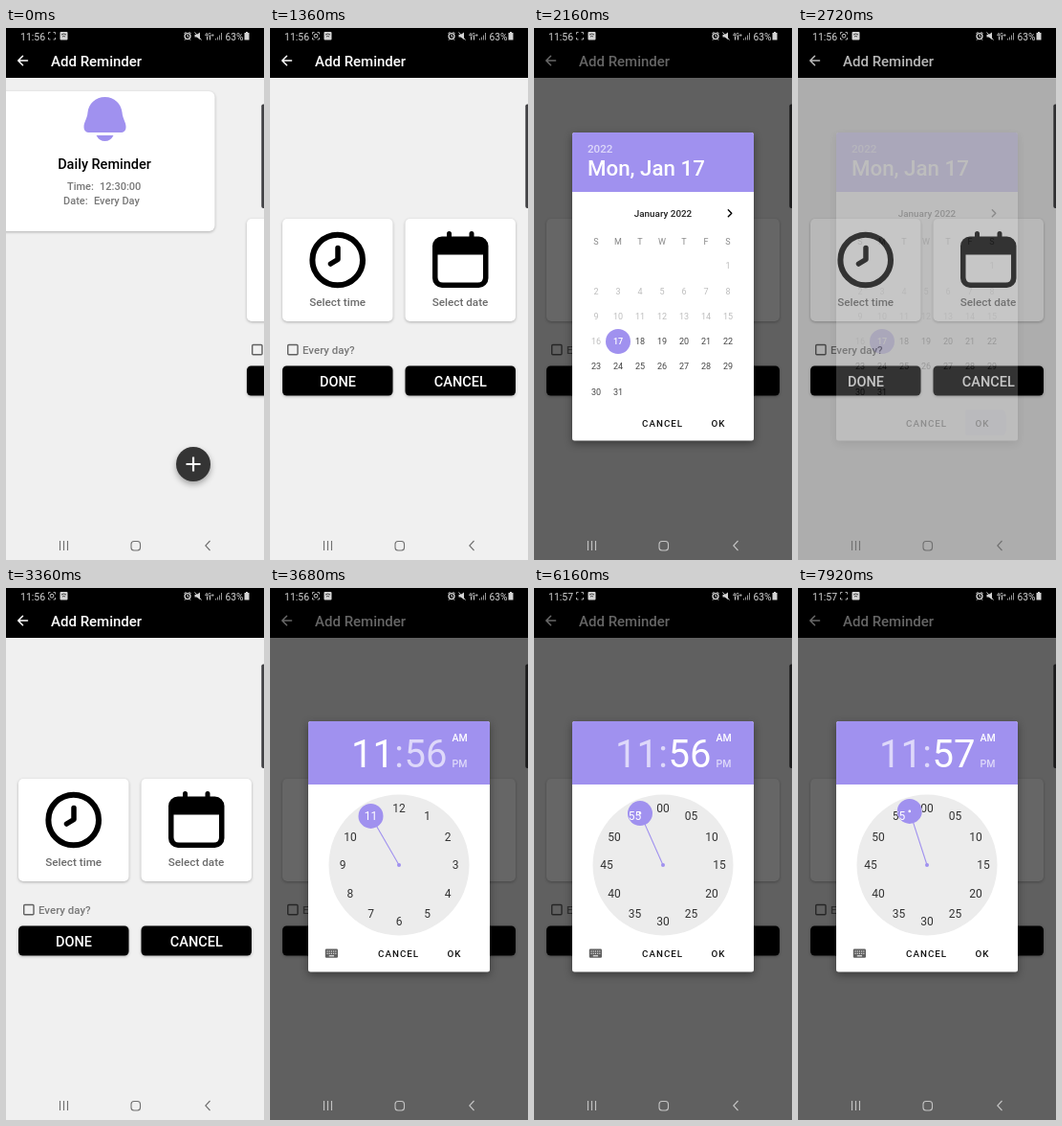
Write an HTML page that moves like this. It is 270x555 px and loops after 8000 ms.

```html
<!DOCTYPE html>
<html lang="en">
<head>
<meta charset="utf-8">
<title>Add reminder</title>
<style>
  html, body { margin: 0; width: 100%; height: 100%; overflow: hidden; background: #f0f0f0; }
  svg { display: block; width: 100vw; height: 100vh; }
  text { font-family: Roboto, "Open Sans", sans-serif; }
  .m { font-weight: 500; }
  .mid { text-anchor: middle; }
  .white { fill: #fff; }
  .soft { fill: #fff; fill-opacity: .65; }
  .grey { fill: #787878; }
  .purple { fill: #a091ef; }
  .card { fill: #fff; filter: drop-shadow(0 1px 1.5px #0004); }
  .dialog { filter: drop-shadow(0 3px 4px #0006); }
  .line { fill: none; stroke: #000; stroke-linecap: round; stroke-linejoin: round; }
  .action { font-size: 9.8px; font-weight: 500; letter-spacing: 1px; fill: #111; }
  .button { font-size: 14.5px; font-weight: 500; fill: #fff; text-anchor: middle; }
  .caption { font-size: 11.7px; font-weight: 500; fill: #6c6c6c; text-anchor: middle; }
  .cell { font-size: 9px; text-anchor: middle; }
  .labels { font-size: 12px; text-anchor: middle; }
  .big { font-size: 40px; }
</style>
</head>
<body>
<svg viewBox="0 0 270 555" preserveAspectRatio="none">
  <defs>
    <clipPath id="knobClip"><circle id="knobHole" r="13"/></clipPath>
    <clipPath id="okClip"><rect x="175" y="398" width="43" height="27" rx="3"/></clipPath>
  </defs>
  <rect width="270" height="555" fill="#f0f0f0"/>

  <g id="listPage">
    <rect class="card" x="20" y="66" width="229.500" height="146" rx="6"/>
    <g class="purple" transform="translate(134.500)">
      <path d="M0 72C10 72 17 79 18 88C18.600 95 22 98 22 103C22 107 20 109 16 109H-16C-20 109-22 107-22 103C-22 98-18.600 95-18 88C-17 79-10 72 0 72Z"/>
      <path d="M-9 112H9Q6 118 0 118T-9 112Z"/>
    </g>
    <text class="m mid" x="134" y="147" font-size="14.500">Daily Reminder</text>
    <g class="m grey" font-size="11">
      <text x="95" y="169">Time:</text><text x="129" y="169">12:30:00</text>
      <text x="91" y="184">Date:</text><text x="123" y="184">Every Day</text>
    </g>
    <circle cx="227" cy="455" r="18" fill="#343434" style="filter:drop-shadow(0 3px 3px #0005)"/>
    <path d="M219.500 455h15M227 447.500v15" stroke="#fff" stroke-width="2.200"/>
  </g>

  <g id="formPage">
    <rect class="card" x="13" y="199" width="115.500" height="107" rx="5"/>
    <rect class="card" x="141.500" y="199" width="115.500" height="107" rx="5"/>
    <circle class="line" cx="70.700" cy="242" r="26.300" stroke-width="6"/>
    <path class="line" d="M71 229.500V241.500L63.500 246" stroke-width="5.500"/>
    <rect x="170" y="217.500" width="58.500" height="53.500" rx="10"/>
    <path class="white" d="M175.500 236.500H223V260Q223 265.500 217.500 265.500H181Q175.500 265.500 175.500 260Z"/>
    <path class="line" d="M187.500 214.500v6M211 214.500v6" stroke-width="5"/>
    <text class="caption" x="70.700" y="290">Select time</text>
    <text class="caption" x="199" y="290">Select date</text>
    <rect x="18.700" y="330.500" width="10.300" height="10.300" rx="1" fill="none" stroke="#606060" stroke-width="1.400"/>
    <text class="m grey" x="34" y="340" font-size="11.500">Every day?</text>
    <rect class="card" style="fill:#000" x="13" y="352.500" width="115.500" height="31" rx="4.500"/>
    <rect class="card" style="fill:#000" x="141.500" y="352.500" width="115.500" height="31" rx="4.500"/>
    <text class="button" x="71" y="374">DONE</text>
    <text class="button" x="199.300" y="374">CANCEL</text>
  </g>

  <rect width="270" height="52"/>
  <path class="line" d="M22.500 34H13M17.500 29.300L12.800 34L17.500 38.700" style="stroke:#fff" stroke-width="1.600"/>
  <text class="m white" x="47" y="40" font-size="15">Add Reminder</text>
  <rect x="267.300" y="79.500" width="6" height="108.500" rx="2" fill="#414144"/>

  <rect id="scrim" width="270" height="555"/>

  <!-- status bar -->
  <g fill="#d4d4d4">
    <text id="clock" x="15" y="12.500" font-size="10.500"></text>
    <path d="M44.500 6.500v-2h2M49.500 4.500h2v2M44.500 10v2h2M49.500 12h2v-2" fill="none" stroke="#aaa"/>
    <circle id="eye" cx="48" cy="8.200" r="1.900" fill="none" stroke="#ccc"/>
    <rect x="56.500" y="4" width="8" height="8.500" rx="1"/>
    <path d="M58 7q2.500-2 5 0M59 9q1.500-1.200 3 0" fill="none" stroke="#333" stroke-width=".9"/>
    <circle cx="190" cy="8.600" r="3" fill="none" stroke="#d4d4d4" stroke-width="1.300"/>
    <path d="M186.500 6l2-2M193.500 6l-2-2M190 7v2h1.500M188 11.500l-1 1.200M192 11.500l1 1.200M197.500 4.500l7 8" stroke="#d4d4d4" fill="none"/>
    <path d="M197.500 7h2l3.500-2.500v7.500l-3.500-2.500h-2Z"/>
    <text class="m" x="208" y="8.500" font-size="5.500">4G+</text>
    <path d="M210.500 9v3.500M213.500 9v3.500" stroke="#d4d4d4"/>
    <path d="M219.500 12.500v-1.500M221.500 12.500v-3M223.500 12.500v-5M225.500 12.500v-7.500" stroke="#999"/>
    <text x="229.500" y="12.500" font-size="10.200">63%</text>
    <path d="M249.500 5h1.500v-1h2v1h1.500v7.500h-5Z"/>
  </g>

  <!-- navigation bar -->
  <g id="nav" fill="none" stroke-width="1.100">
    <path d="M56.500 535v10M60.500 535v10M64.500 535v10M213.500 535l-4.700 5l4.700 5"/>
    <rect x="131" y="535.500" width="9.500" height="9.500" rx="3"/>
  </g>

  <g id="dateDialog" class="dialog">
    <rect class="white" x="40" y="109" width="190" height="321.500" rx="2.500"/>
    <path class="purple" d="M40 171V111.500Q40 109 42.500 109H227.500Q230 109 230 111.500V171Z"/>
    <text class="m soft" x="56" y="130" font-size="11.600">2022</text>
    <text class="m white" x="56" y="154" font-size="22.300">Mon, Jan 17</text>
    <text class="m mid" x="135" y="197" font-size="9.900" fill="#222">January 2022</text>
    <path class="line" d="M203.300 189.800l3.500 3.500l-3.500 3.500" stroke-width="1.400"/>
    <circle class="purple" cx="88" cy="327" r="13"/>
    <g id="days"></g>
    <circle id="ripple" class="purple" cx="193" cy="412" clip-path="url(#okClip)" fill-opacity=".15"/>
    <text class="action" x="113" y="416">CANCEL</text>
    <text class="action" x="185.500" y="416">OK</text>
  </g>

  <g id="timeDialog" class="dialog">
    <rect class="white" x="40" y="139" width="190" height="261.500" rx="2.500"/>
    <path class="purple" d="M40 205V141.500Q40 139 42.500 139H227.500Q230 139 230 141.500V205Z"/>
    <text id="hour" class="big" x="85" y="187">11</text>
    <text class="big soft" x="130.200" y="187">:</text>
    <text id="minute" class="big" x="140.500" y="187"></text>
    <text class="m white" x="190.500" y="160" font-size="10.500">AM</text>
    <text class="m soft" x="190.500" y="186.500" font-size="10.500">PM</text>
    <circle cx="135" cy="289" r="73.500" fill="#ececec"/>
    <g class="labels" fill="#333"><g id="hours"></g><g id="minutes"></g></g>
    <path id="hand" stroke="#a091ef" stroke-width="1.100"/>
    <circle class="purple" cx="135" cy="289" r="2"/>
    <circle id="knob" class="purple" r="13"/>
    <g class="labels white" clip-path="url(#knobClip)"><use href="#hours"/><use href="#minutes"/></g>
    <circle id="dot" class="white" r="1.300"/>
    <rect x="57.800" y="376.500" width="13.200" height="9.200" rx="1.200" fill="#606060"/>
    <path d="M59.500 379h10M59.500 381.300h10" stroke="#fff" stroke-dasharray="1.100 1.100"/>
    <path d="M61.800 383.800h5.200" stroke="#fff"/>
    <text class="action" x="113" y="385">CANCEL</text>
    <text class="action" x="185.500" y="385">OK</text>
  </g>
</svg>

<script>
const LOOP = 8000, STEP = 80;
const $ = id => document.getElementById(id);
const set = (id, attrs) => { for (const k in attrs) $(id).setAttribute(k, attrs[k]); };
const progress = (t, from, to) => Math.min(1, Math.max(0, (t - from) / (to - from)));
const label = (x, y, text, extra = '') => `<text x="${x}" y="${y}" ${extra}>${text}</text>`;
const onDial = deg => {
  const a = deg * Math.PI / 180;
  return [135 + 59 * Math.sin(a), 289 - 59 * Math.cos(a)];
};

// Calendar: the month starts on a Saturday
let cells = '';
[...'SMTWTFS'].forEach((d, i) => cells += label(65 + 23 * i, 226, d, 'class="cell" fill="#888"'));
for (let d = 1; d <= 31; d++) {
  const i = d + 5;
  const fill = d < 17 ? '#bdbdbd' : d === 17 ? '#fff' : '#444';
  cells += label(65 + 23 * (i % 7), 251.2 + 26.3 * Math.floor(i / 7), d,
    `class="cell${d === 17 ? ' m' : ''}" fill="${fill}"`);
}
$('days').innerHTML = cells;

for (let i = 0; i < 12; i++) {
  const [x, y] = onDial(i * 30);
  $('hours').innerHTML += label(x, y + 4.2, i || 12);
  $('minutes').innerHTML += label(x, y + 4.2, String(i * 5).padStart(2, '0'));
}

function showDialog(id, alpha, scale) {
  set(id, {
    opacity: alpha,
    display: alpha > 0 ? 'inline' : 'none',
    transform: `translate(135 269.5) scale(${scale}) translate(-135 -269.5)`
  });
}

function draw(t) {
  // Page slide
  const shift = 135 * (1 - Math.cos(Math.PI * progress(t, -66, 234)));
  set('listPage', { transform: `translate(${-shift})` });
  set('formPage', { transform: `translate(${270 - shift})` });

  // Status bar
  $('clock').textContent = t < 3840 ? '11:56' : '11:57';
  set('eye', { opacity: (t + 692) % 1010 < 505 ? 1 : 0 });

  // Dialogs
  const dateIn = progress(t, 1600, 1760), timeIn = progress(t, 3520, 3680);
  const dim = Math.max(dateIn * (1 - progress(t, 2560, 2860)), timeIn);
  set('scrim', { opacity: .6 * dim });
  set('nav', { stroke: dim > .7 ? '#c4c4c4' : '#707070' });
  showDialog('dateDialog', dateIn * (1 - progress(t, 2560, 2760)), .9 + .1 * dateIn);
  showDialog('timeDialog', timeIn, .9 + .1 * timeIn);
  set('ripple', { r: 26 * progress(t, 2400, 2600) });

  // Dial switches from hours to minutes, then the minute is dragged
  const toMinutes = progress(t, 4600, 5160);
  const minute = t < 6400 ? 56 : 57;
  const angle = 330 + (minute * 6 - 330) * toMinutes;
  const [x, y] = onDial(angle);
  $('minute').textContent = minute;
  $('hour').setAttribute('class', toMinutes ? 'big soft' : 'big white');
  $('minute').setAttribute('class', toMinutes ? 'big white' : 'big soft');
  set('hours', { opacity: 1 - toMinutes });
  set('minutes', { opacity: toMinutes });
  set('hand', { d: `M135 289L${x} ${y}` });
  for (const id of ['knob', 'knobHole', 'dot']) set(id, { cx: x, cy: y });
  set('dot', { opacity: toMinutes });
}

function tick() {
  draw(Math.floor(performance.now() % LOOP / STEP) * STEP);
  requestAnimationFrame(tick);
}
tick();
</script>
</body>
</html>
```
